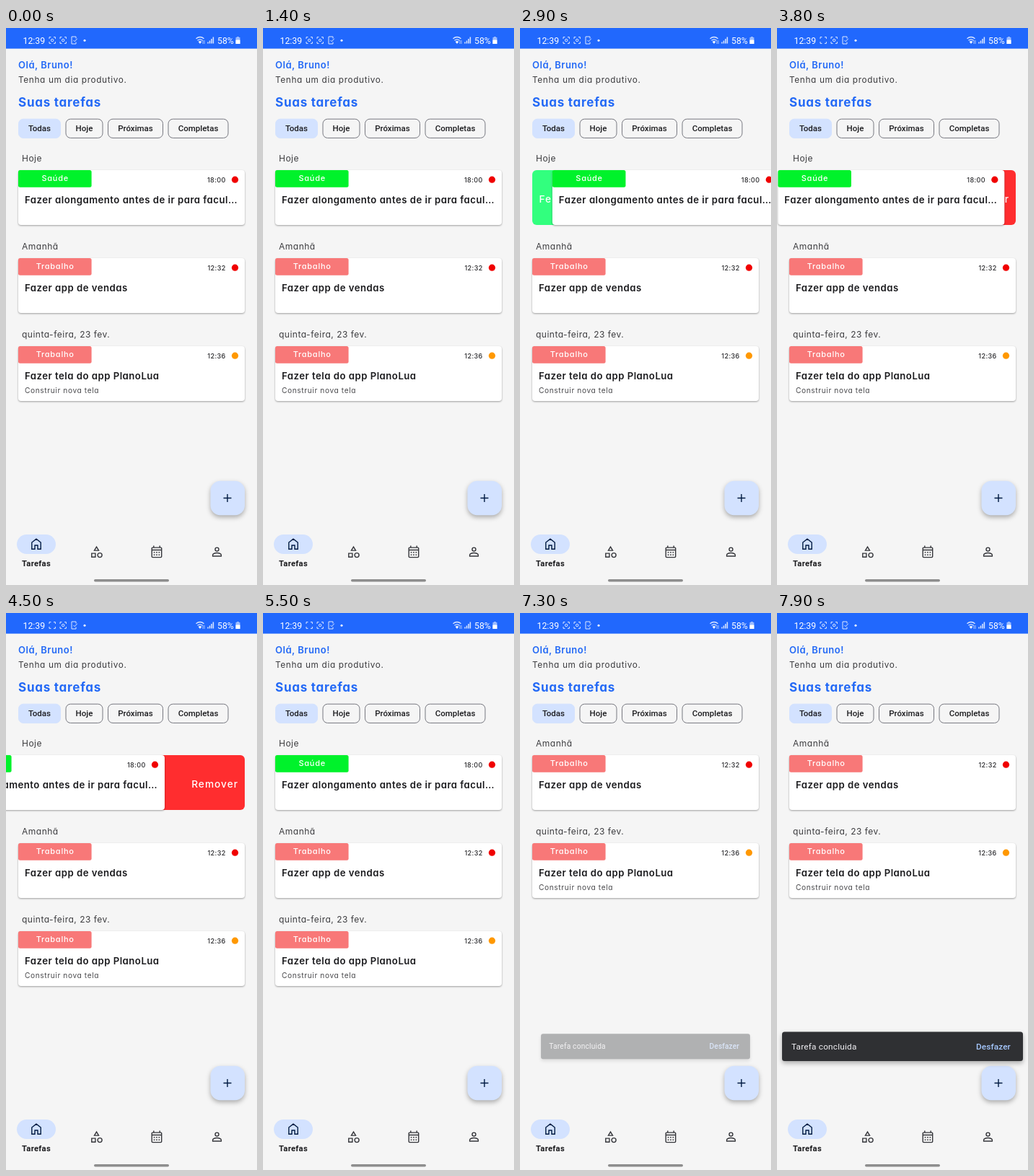
An HTML page for the animation above (8 s loop, 348 by 772 pixels).

```html
<!DOCTYPE html>
<html lang="pt">
<head>
<meta charset="utf-8">
<style>
html, body { margin: 0; width: 100%; height: 100%; overflow: hidden; background: #f5f5f5; }
svg { display: block; width: 100%; height: 100%; }
text { font-family: Inter, sans-serif; font-feature-settings: "cv11"; fill: #3c3c3f; }
.hello { font-size: 13px; font-weight: 600; letter-spacing: .5px; fill: #2369f6; }
.lead { font-size: 11.8px; letter-spacing: .65px; }
.head { font-size: 17px; font-weight: 650; letter-spacing: .75px; fill: #2369f6; }
.day { font-size: 12px; letter-spacing: .5px; }
.title { font-size: 13.2px; font-weight: 600; letter-spacing: .48px; fill: #1b1b1e; }
.note { font-size: 10.2px; letter-spacing: .6px; fill: #4a4a4d; }
.tag { font-size: 11px; font-weight: 500; letter-spacing: .75px; fill: #fff; text-anchor: middle; }
.time { font-size: 9.1px; font-weight: 500; letter-spacing: .35px; text-anchor: end; fill: #2a2a2d; }
.action { font-size: 13.7px; font-weight: 500; letter-spacing: 1px; fill: #fff; }
.ui text { font-family: Roboto, sans-serif; }
.chip { font-size: 11.5px; font-weight: 500; text-anchor: middle; fill: #1b1b1e; }
.status { font-size: 12.3px; fill: #fff; }
.nav { font-size: 11.2px; font-weight: 700; letter-spacing: .3px; text-anchor: middle; fill: #1b1b1e; }
.snack { font-size: 11.8px; letter-spacing: .2px; fill: #f1f0f4; }
.undo { font-size: 11.8px; font-weight: 500; letter-spacing: .1px; fill: #a6c8ff; }
.line { fill: none; stroke: #35363b; stroke-width: 1.4; }
.line.dark { stroke: #001a41; }
.white { fill: none; stroke: #fff; stroke-width: 1; opacity: .85; }
.card { filter: drop-shadow(0 1px 1.3px rgba(0,0,0,.36)); }
.lift { filter: drop-shadow(0 3px 3px rgba(0,0,0,.3)); }
</style>
</head>
<body>
<svg viewBox="0 0 348 772" preserveAspectRatio="none">
  <rect width="348" height="772" fill="#f5f5f5"/>

  <text class="hello" x="17" y="56">Olá, Bruno!</text>
  <text class="lead" x="17" y="75.5">Tenha um dia produtivo.</text>
  <text class="head" x="17" y="109">Suas tarefas</text>
  <g class="ui" id="chips"></g>

  <g id="first">
    <text class="day" x="22" y="185">Hoje</text>
    <g id="under">
      <rect id="fill" x="17" y="197" width="314" height="76" rx="6"/>
      <text class="action" id="done" x="26.5" y="242">Feito!</text>
      <text class="action" id="remove" x="322" y="242" text-anchor="end">Remover</text>
    </g>
    <g id="swipe"></g>
  </g>
  <g id="rest"></g>

  <g class="ui">
    <rect width="348" height="28.6" fill="#2168fd"/>
    <text class="status" x="23.5" y="21.5">12:39</text>
    <g class="white">
      <path id="brackets" d="M60 15v-2.4h2.4M66 12.6h2.4v2.4M68.4 19v2.4h-2.4M62.4 21.4h-2.4v-2.4"/>
      <use href="#brackets" x="15"/>
      <circle id="lens" cx="64.2" cy="17" r="1.7"/>
      <circle cx="79.2" cy="17" r="1.7"/>
      <path d="M97 14.5v-2.5h-6v10h6v-2.5M93.5 17l1.7 1.7 3.6-4"/>
      <path d="M263.5 14.8q5.5-4.6 11 0M265.5 17.3q3.5-3 7 0" stroke-width="1.3"/>
      <path d="M280 21.5v-2M282.5 21.5v-4M285 21.5v-6.5M287.4 21.5v-9" stroke-width="1.5"/>
    </g>
    <path d="M267 19l2 2.5 2-2.5q-2-1.500-4 0zM273 17v5M275 17v5" fill="#fff" stroke="#fff" stroke-width=".6"/>
    <circle cx="109" cy="17.3" r="1.5" fill="#fff"/>
    <text class="status" x="293" y="21.5">58%</text>
    <path d="M320 12h3v1h1.5v9h-6v-9h1.5z" fill="#fff" fill-opacity=".55"/>
    <rect x="318.5" y="16.5" width="6" height="5.5" fill="#fff"/>

    <rect class="lift" x="283.5" y="627.7" width="47.5" height="47.5" rx="13.5" fill="#d3e2ff"/>
    <path class="line dark" d="M301.5 651.5h11M307 646v11"/>

    <rect x="15" y="702" width="54" height="27" rx="13.5" fill="#d3e2ff"/>
    <path class="line dark" d="M35.8 722.2V713l6.2-4.8 6.2 4.8v9.2H44v-5.2h-4v5.2z"/>
    <text class="nav" x="42" y="746">Tarefas</text>
    <g class="line">
      <path d="M125.5 719.2l-3 4.9h6zM118.8 728.1h5.1v5.1h-5.1z"/>
      <circle cx="130.1" cy="730.6" r="3"/>
      <rect x="202.2" y="720.1" width="13.5" height="13.5" rx="1"/>
      <path d="M202 723.5h14M204.8 717.6v2.5M213.2 717.6v2.5"/>
      <path d="M204.7 726.8h8.6M204.7 730.2h8.6" stroke-dasharray="1.7"/>
      <circle cx="292.5" cy="722.6" r="2.5"/>
      <path d="M286.6 732v-1.8c0-1.6 3.4-2.7 5.9-2.7s5.9 1.1 5.9 2.7v1.8z"/>
    </g>
    <rect x="122" y="764" width="104" height="3.5" rx="1.7" fill="#8e8e8e"/>

    <g id="snack">
      <rect class="lift" x="7" y="580.5" width="334" height="40.5" rx="3.5" fill="#2f3033"/>
      <text class="snack" x="20" y="605">Tarefa concluida</text>
      <text class="undo" x="276" y="605">Desfazer</text>
    </g>
  </g>
</svg>
<script>
const $ = id => document.getElementById(id);
const show = (id, on) => $(id).style.display = on ? '' : 'none';

const chip = (x, w, label, on) => `
  <rect x="${x + .5}" y="126.2" width="${w - 1}" height="26.2" rx="6.5"
    fill="${on ? '#d3e2ff' : 'none'}" stroke="${on ? '#d3e2ff' : '#777880'}"/>
  <text class="chip" x="${x + w / 2}" y="143.3">${label}</text>`;

const card = (y, tag, color, title, time, dot, note = '') => `
  <rect class="card" x="17" y="${y}" width="314" height="76" rx="4" fill="#fff"/>
  <rect x="17" y="${y}" width="101.6" height="23.7" rx="2.5" fill="${color}"/>
  <text class="tag" x="68.2" y="${y + 15}">${tag}</text>
  <text class="time" x="304.7" y="${y + 16.5}">${time}</text>
  <circle cx="317.5" cy="${y + 13.2}" r="4.6" fill="${dot}"/>
  <text class="title" x="26" y="${y + 46}">${title}</text>
  <text class="note" x="26" y="${y + 64.5}">${note}</text>`;

const day = (y, label) => `<text class="day" x="22" y="${y}">${label}</text>`;

$('chips').innerHTML = chip(17, 59, 'Todas', true) + chip(82.5, 52, 'Hoje')
  + chip(141, 77, 'Próximas') + chip(224.5, 84, 'Completas');
$('swipe').innerHTML = card(197, 'Saúde', '#00f22b',
  'Fazer alongamento antes de ir para facul…', '18:00', '#f00000');
$('rest').innerHTML = day(307, 'Amanhã')
  + card(319, 'Trabalho', '#f87878', 'Fazer app de vendas', '12:32', '#f00000')
  + day(429, 'quinta-feira, 23 fev.')
  + card(441, 'Trabalho', '#f87878', 'Fazer tela do app PlanoLua', '12:36', '#ff9800', 'Construir nova tela');

// Finger position: [ms, card offset]
const drag = [[0, 0], [1450, 0], [2000, 67], [2250, 86], [2450, 82], [2900, 28], [3100, 0],
  [3700, 0], [4100, -62], [4500, -111], [4700, -115], [5100, -50], [5400, 0],
  [6400, 0], [6700, 64], [6900, 150], [7100, 348], [8000, 348]];

function offset(t) {
  const i = drag.findIndex(p => p[0] > t);
  const [t0, x0] = drag[i - 1], [t1, x1] = drag[i];
  return x0 + (x1 - x0) * (t - t0) / (t1 - t0);
}

function draw() {
  const t = performance.now() % 8000;
  const x = offset(t), removed = t >= 7200;
  $('swipe').setAttribute('transform', `translate(${x})`);
  $('fill').setAttribute('fill', x > 0 ? '#32ff7e' : '#ff2d2f');
  show('under', x !== 0);
  show('done', x > 0);
  show('remove', x < 0);
  show('first', !removed);
  $('rest').setAttribute('transform', `translate(0 ${removed ? -122 : 0})`);
  show('lens', t < 3400 || t >= 7300);

  const p = Math.min(1, Math.max(0, (t - 7250) / 150)), s = .8 + .2 * p;
  $('snack').setAttribute('opacity', p);
  $('snack').setAttribute('transform', `translate(174 601) scale(${s}) translate(-174 -601)`);
  requestAnimationFrame(draw);
}
draw();
</script>
</body>
</html>
```
